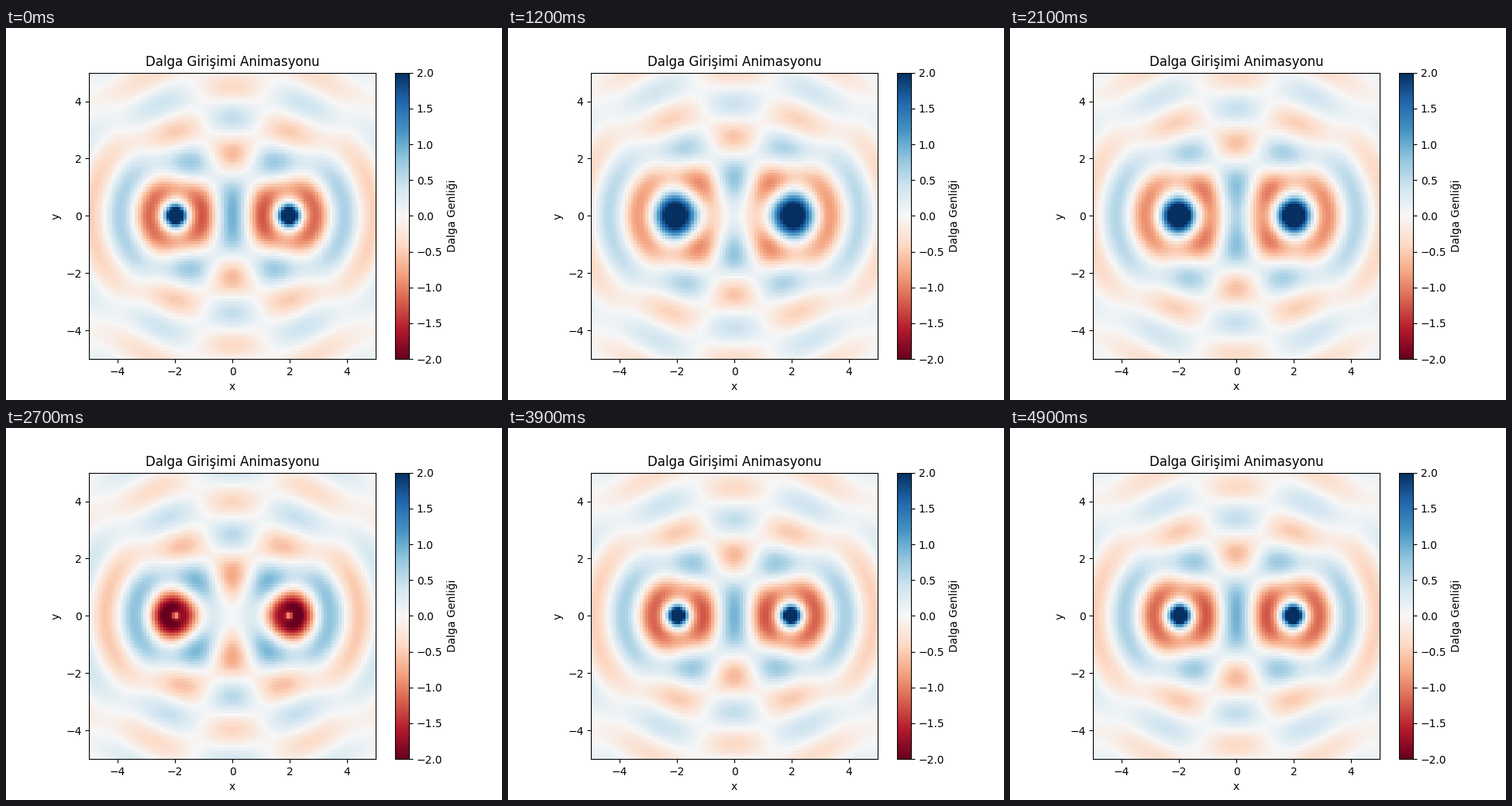
Write a matplotlib script that moves like this. It is 640x480 px and loops after 5 s.

```python
import numpy as np
import matplotlib.pyplot as plt
from matplotlib.animation import FuncAnimation

FRAMES = 50
CYCLES = 5
WAVELENGTH = 2.0
SOFTENING = 0.1  # keeps the amplitude finite at the sources
SOURCES = [(-2, 0), (2, 0)]

axis = np.linspace(-5, 5, 100)
X, Y = np.meshgrid(axis, axis)
distances = [np.hypot(X - sx, Y - sy) for sx, sy in SOURCES]


def wave_field(frame):
    """Sum of the circular waves leaving both sources."""
    phase = 2 * np.pi * CYCLES * frame / (FRAMES - 1)
    k = 2 * np.pi / WAVELENGTH
    return sum(np.cos(k * r - phase) / (r + SOFTENING) for r in distances)


fig, ax = plt.subplots(figsize=(6.4, 4.8), dpi=100)
image = ax.imshow(wave_field(0), extent=(-5, 5, -5, 5), origin="lower",
                  cmap="RdBu", vmin=-2, vmax=2)
fig.colorbar(image, ax=ax, label="Dalga Genliği")
ax.set_title("Dalga Girişimi Animasyonu")
ax.set_xlabel("x")
ax.set_ylabel("y")


def update(frame):
    image.set_data(wave_field(frame))
    return [image]


animation = FuncAnimation(fig, update, frames=FRAMES, interval=100, repeat=True)
plt.show()
```
